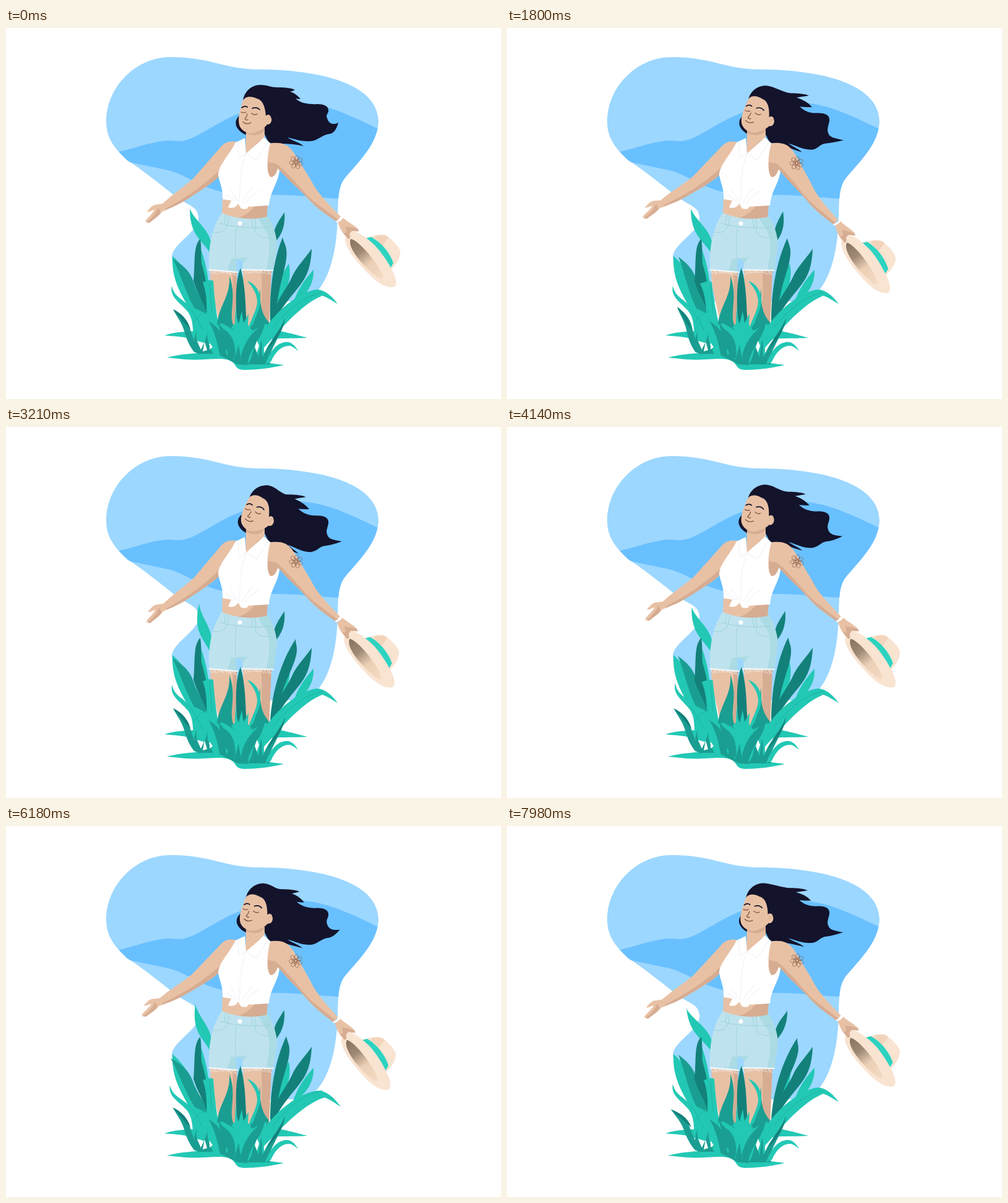
An HTML page that plays this animation: 800 by 600 pixels, repeating every 8 s.

```html
<!DOCTYPE html>
<html lang="en">
<head>
<meta charset="utf-8">
<title>Summer breeze</title>
<style>
  html, body { margin: 0; width: 100%; height: 100%; overflow: hidden; background: #fff; }
  svg { display: block; width: 100vw; height: 100vh; }
  .sky { fill: #9cd7ff } .hill { fill: #69c0ff }
  .skin { fill: #e8c1a5 } .shade { fill: #d6ac92 } .hair { fill: #13132b }
  .bright { fill: #22c8b4 } .mid { fill: #1a9e92 } .dark { fill: #13817a }
  .denim { fill: #bfe3ee } .denim2 { fill: #a5d8e2 } .white { fill: #fff }
  .line { fill: none; stroke-linecap: round; stroke-linejoin: round }
  .seam { stroke: #9bd2dd; stroke-width: 1 }
  .fold { stroke: #f1f3f8; stroke-width: 1.2 }
  .hem { stroke: #f4fafc; stroke-width: 2 }
  .fray { stroke: #f4fafc; stroke-width: .9 }
  .ink { stroke: #8c5f4a; stroke-width: .7 }
  .brow { stroke: #13132b; stroke-width: 1.7 }
  .lash { stroke: #7b4a3c; stroke-width: 1.2 }
  .vein { stroke: #1bb3a2; stroke-width: 1 }
</style>
</head>
<body>
<svg viewBox="0 0 800 600">
  <defs>
    <path id="blob" d="M162 152C162 95 210 47 266 47C330 47 352 66 405 67C480 66 602 82 602 152C600 186 575 211 549 241C533 259 538 288 535 326C532 367 522 405 502 427L465 442H320C305 420 272 400 268 372C266 350 314 329 311 306C309 288 299 290 272 271C240 245 215 226 196 214C178 197 162 180 162 152Z"/>
    <clipPath id="inBlob"><use href="#blob"/></clipPath>
    <linearGradient id="lining" gradientUnits="userSpaceOnUse" x1="560" y1="344" x2="606" y2="402">
      <stop offset="0" stop-color="#8b7662"/><stop offset=".3" stop-color="#a08a75"/>
      <stop offset=".62" stop-color="#ebcfb5"/><stop offset="1" stop-color="#f3d9c1"/>
    </linearGradient>
  </defs>

  <use href="#blob" class="sky"/>
  <path class="hill" clip-path="url(#inBlob)" d="M175 202L183 200C210 194 237 183 262 182C272 182 278 184 288 182C312 177 340 152 380 137C410 124 440 119 470 120C520 122 558 143 610 167V280L537 276C500 274 475 270 430 270C390 272 355 268 345 264C312 256 288 236 262 230L190 215Z"/>

  <!-- grass behind; data-gusts: time and sideways push of the tip -->
  <path class="bright" data-gusts="3210 15, 6180 9, 7980 -7" d="M297 292C304 310 326 324 331 345L330 364C316 342 297 335 297 292Z"/>
  <path class="dark" data-gusts="1800 -4, 5160 -7, 7980 3" d="M450 298C440 314 430 325 432 349C444 338 452 322 450 298Z"/>
  <path class="bright" d="M457 381C444 400 434 425 440 446C458 420 461 401 457 381Z"/>
  <path class="bright" d="M497 391C484 405 470 424 463 448C484 434 498 416 497 391Z"/>
  <path class="bright" d="M269 369C291 387 309 420 320 470L330 500L312 485C292 440 267 418 269 369Z"/>

  <path id="hair" class="hair"/>
  <path id="tuft" class="hair" d="M377 142C367 151 370 165 388 173L396 166V148Z"/>

  <g id="leftArm">
    <path class="skin" d="M372 184C357 182 351 187 343 197L303 243C289 256 270 268 253 284L240 286C235 288 231 293 228 297C230 299 237 294 240 294C236 301 229 307 226 311C224 314 229 316 232 315C239 308 247 305 252 297C265 292 283 283 302 271C318 260 336 250 347 237L372 210Z"/>
    <path class="shade" d="M362 200C355 222 338 238 322 250C305 264 287 276 258 292L258 294C278 287 290 279 302 271C318 260 336 250 347 237L368 212ZM246 290C243 299 236 307 228 314L232 315C240 308 246 305 250 298Z"/>
  </g>

  <!-- legs -->
  <path class="skin" d="M330 390H372C374 430 366 460 368 486H345C342 450 330 430 330 390ZM383 390H429L425 486H389C388 450 383 425 383 390Z"/>
  <path class="shade" d="M412 390H429L425 486H414C410 460 416 425 412 390ZM366 394H373C374 430 371 460 370 486H362C362 450 369 430 366 394Z"/>

  <!-- torso -->
  <path class="skin" d="M388 160L387 208H402L418 180V158ZM350 275L423 283L421 308C395 314 365 308 349 300Z"/>
  <path class="shade" d="M388 166C398 170 410 168 419 156L417 167C408 176 398 174 388 170ZM418 178L400 199L389 204L408 183ZM423 284L421 308C405 312 390 311 374 307C392 303 398 291 406 285Z"/>
  <path class="white" d="M371 185L386 178L388 203L417 177L428 187L442 230C440 252 427 262 425 287L391 289C392 292 386 294 380 292L375 284C372 291 365 292 359 290L364 279L350 277C351 260 345 250 343 238C343 222 360 207 371 185Z"/>
  <path class="line fold" d="M375 185L376 210L388 203L405 214L422 186M388 203C376 235 379 260 377 282M356 270L371 280M363 262L375 280M399 258C391 266 386 274 382 282M410 263C400 268 392 276 386 284"/>

  <!-- shorts -->
  <path class="denim" d="M349 299C370 309 400 311 424 305C434 322 440 346 437 358L432 393L381 391L376 374L374 395L328 391C327 350 333 322 349 299Z"/>
  <path class="denim2" opacity=".75" d="M408 308L424 305C434 322 440 346 437 358L432 393H421C424 370 430 345 420 328C416 320 411 316 408 308ZM364 373L391 371L383 381L381 391L376 374L374 395L358 391Z"/>
  <path class="sky" d="M372 375Q377 372 382 378L383 394H373Z"/>
  <path class="line seam" d="M346 316C370 323 400 325 427 322M372 325C370 340 371 360 371 371M334 330C346 333 356 328 357 319M402 324C402 336 413 340 424 339M355 303L353 317M360 305L358 319M397 309L399 323M402 308L404 323"/>
  <circle cx="378" cy="316" r="3.5" class="white"/>
  <path class="line hem" d="M328 391L374 395M381 391L432 392"/>
  <path id="fray" class="line fray"/>

  <g id="head">
    <path class="skin" d="M383 117C379 130 374 145 377 157C380 166 390 171 399 170C411 167 419 160 422 156C428 157 431 149 428 144C427 140 423 139 420 142C419 128 415 116 405 114C397 110 387 110 383 117Z"/>
    <path class="line brow" d="M381 129Q386 125 390 128M398 130Q405 127 410 132"/>
    <path class="line lash" d="M380 136Q384 138 388 136M397 138Q402 142 406 139M390 139Q389 144 386 147Q388 150 391 148M383 152Q389 157 396 153"/>
    <path class="line" stroke="#d6ac92" d="M422 149Q424 145 427 145"/>
  </g>

  <path class="skin" d="M427 187C422 205 420 232 427 241C434 242 438 233 441 222L461 218L452 191C442 185 434 185 427 187Z"/>
  <path class="shade" d="M424 216C422 226 423 236 428 241C434 241 437 235 441 222C433 217 428 219 424 216Z"/>

  <g id="rightArm">
    <path class="skin" d="M430 187C449 183 459 191 468 206L494 248C503 267 522 286 541 305L534 313C518 302 505 293 495 283C477 263 459 249 440 224Z"/>
    <path class="shade" d="M432 218C444 222 452 234 464 245C480 263 491 277 506 287L537 310L534 313C518 302 505 293 495 283C477 263 459 249 440 228Z"/>
    <g id="tattoo" class="line ink"></g>
    <path fill="#f9e3d1" d="M582 340C600 333 613 333 619 339C631 349 639 358 637 366C635 377 628 385 622 391L598 373Z"/>
    <path fill="#f3d4bb" d="M598 336C610 333 615 335 618 339L608 353C605 347 602 344 596 340Z"/>
    <path fill="#2dd3c1" d="M582 340L590 338C606 346 621 364 626 380L621 389C612 369 598 350 582 340Z"/>
    <path fill="#f9e3d1" d="M558 327C582 333 609 363 621 386C631 402 634 418 626 419C606 421 586 398 573 384C557 367 544 345 549 338Z"/>
    <path fill="url(#lining)" d="M557 341C569 343 596 374 606 394C612 405 609 408 602 404C582 390 550 356 557 341Z"/>
    <path class="skin" d="M536 313L545 307C552 314 561 317 569 325L570 329L559 327L555 333C557 338 556 341 553 341C546 334 540 327 536 313Z"/>
    <path class="shade" d="M548 321C558 323 562 322 569 326L570 329L559 328L555 333C557 338 556 341 553 341L544 330C550 333 552 331 548 321Z"/>
    <path class="line" stroke="#fff" stroke-width="3" d="M535 313Q541 311 544 306"/>
  </g>

  <!-- grass in front -->
  <path class="dark" data-gusts="0 -6, 3210 15, 7980 16" d="M453 340C455 350 459 354 458 366C456 392 441 415 437 466L427 475C427 430 434 380 453 340Z"/>
  <path class="dark" d="M494 357C484 372 468 388 462 403C452 425 434 442 427 478L438 467C450 446 462 433 473 419C487 402 493 385 494 357Z"/>
  <path class="bright" d="M315 358C321 374 328 400 330 440L325 460C316 430 313 390 315 358Z"/>
  <path class="mid" data-gusts="0 -7, 3210 -8, 6180 -11" d="M277 370C293 382 304 393 308 416C314 435 326 448 328 470L311 462C295 437 288 398 277 370Z"/>
  <path class="dark" d="M314 341C302 352 306 380 303 409C309 430 320 443 325 463L329 460C328 430 322 400 316 381C315 365 316 352 314 341Z"/>
  <path class="bright" data-gusts="1800 -6, 4600 -6" d="M318 411C325 409 330 406 335 409C337 440 341 470 346 492L322 485C326 455 325 430 318 411Z"/>
  <path class="bright" data-gusts="4140 4, 6180 -3" d="M268 417C264 436 282 444 294 459C303 472 301 485 303 493L340 505L341 478C322 454 304 458 285 440C275 433 270 427 268 417Z"/>
  <path class="mid" d="M361 401C363 435 344 448 341 480L345 495L375 492C353 470 376 441 361 401Z"/>
  <path class="dark" d="M379 388C370 410 371 445 374 492L390 485C386 455 389 425 379 388Z"/>
  <path class="mid" d="M411 421C407 440 411 452 400 465L390 500L416 502L425 476C413 462 410 448 411 421Z"/>
  <path class="bright" d="M390 409C402 413 410 424 411 438C412 454 404 463 400 478L390 490C396 470 406 456 406 442C405 427 398 419 390 409Z"/>
  <path class="bright" d="M371 443C371 460 373 470 376 478L381 458L384 477L392 462L391 480L400 492H372L364 484L370 478Z"/>
  <path class="bright" data-gusts="6180 5" d="M536 446C526 433 515 423 502 423C475 426 443 454 426 476L395 510L405 530L435 497C457 472 485 443 511 433C521 436 528 442 536 446Z"/>
  <path class="line vein" d="M511 428C480 433 451 460 432 484M296 452C306 463 311 474 318 488M329 414L333 460M326 458Q309 464 304 476"/>

  <path class="bright" d="M256 497C280 489 302 492 322 488L345 491H400L426 487C455 492 468 496 487 501C462 503 438 500 421 505L400 515H340L305 505C290 499 274 499 256 497Z"/>
  <path class="bright" d="M260 533C283 527 300 527 317 525L331 510C340 490 330 480 350 478L374 492L397 490L421 478C423 496 416 510 417 525L426 542L449 545C430 550 403 553 385 553C367 552 375 543 360 537C345 532 320 538 290 536Z"/>
  <path class="mid" data-gusts="1800 5, 5160 -9, 7980 -5" d="M270 455C281 460 293 470 297 485C301 500 308 515 314 528L304 524C295 512 291 501 288 490C284 476 276 467 270 455Z"/>
  <path class="dark" data-gusts="1800 5, 5160 -9, 7980 -5" d="M270 455C281 460 293 470 298 487C291 481 283 470 270 455Z"/>
  <path class="mid" d="M327 474C343 484 349 490 357 518L352 530L345 527C341 505 336 489 327 474Z"/>
  <path class="mid" d="M343 474C345 494 352 504 358 524L370 535C372 514 368 500 356 490C350 486 346 482 343 474Z"/>
  <path class="mid" d="M419 473C405 490 386 498 379 535L390 545C394 514 414 507 419 473Z"/>
  <path class="mid" d="M326 486C324 502 327 513 335 527L312 527C318 511 325 505 326 486ZM309 488C304 506 314 513 317 527L306 524C303 510 303 501 309 488Z"/>
  <path class="white" d="M321 507L318 523L325 521ZM329 509L329 520L334 516ZM406 506C400 517 402 523 404 529L409 514Z"/>
  <path class="mid" d="M451 469C448 490 434 509 428 525L426 544H390C400 532 397 521 402 516L408 532L412 504C416 516 412 525 415 532C424 507 441 494 451 469Z"/>
  <path class="dark" d="M451 469C448 490 436 505 423 520C430 500 444 490 451 469Z"/>
  <path class="bright" d="M472 522C465 510 457 505 447 509C435 512 425 526 419 544L428 540C436 521 448 513 459 514C465 516 468 519 472 522Z"/>
  <path class="mid" d="M345 529L352 511L357 530L361 518L369 537L376 512L380 538L387 523L391 545L374 544Z"/>
</svg>

<script>
const LOOP = 8000;
const $ = id => document.getElementById(id);
const numbers = text => text.match(/-?[\d.]+/g).map(Number);
const pairs = text => text.split(',').map(numbers);

// Eases from each turning point to the next.
function eased(text) {
  const keys = pairs(text);
  return t => {
    const i = Math.max(1, keys.findIndex(key => key[0] > t));
    const [[t0, v0], [t1, v1]] = [keys[i - 1], keys[i]];
    const u = Math.min(1, (t - t0) / (t1 - t0));
    return v0 + (v1 - v0) * u * u * (3 - 2 * u);
  };
}
const headTilt = eased('0 0, 2900 11.2, 4300 6.8, 8000 3.4');
const hairStretch = eased('0 0, 1800 1, 4140 .75, 5160 1, 6180 .35, 8000 .9');
const rightSwing = eased('0 0, 820 -4.2, 1800 3.1, 2440 -1.8, 3800 2.4, 4980 -6, 6100 2.6, 6900 -1.9, 8000 .8');
const leftSwing = eased('0 0, 1650 2.9, 3210 -.8, 5500 3.8, 7200 1, 8000 1.6');

// Every lock drops as the head tilts back, and the wind stretches its tip.
function hairPath(tilt, stretch) {
  const a = tilt * Math.PI / 180, c = Math.cos(a), s = Math.sin(a);
  const onHead = (x, y) => [404 + (x - 404) * c - (y - 170) * s, 170 + (x - 404) * s + (y - 170) * c];
  const off = (p, x, y) => [p[0] + x, p[1] + y];
  const lock1 = [467 + 21 * stretch, 100 + 1.25 * tilt];
  const lock2 = [476 + 17 * stretch, 115 + 1.7 * tilt];
  const lobe = [521, 133 + 1.9 * tilt];
  const end = off(lobe, 16 + 7 * stretch, 20 + 14 * stretch);
  const belly = [493, 183 + 1.8 * tilt];
  const wisp = [481 - .07 * tilt * tilt, 191 + 1.3 * tilt];
  const curl = 541 - end[0];
  const crest = off(lock1, -28, -4);
  const notch1 = [459 + 9 * stretch, lock1[1] + 3];
  const notch2 = [468 + 5 * stretch, lock2[1] - 1];
  const back = off(lobe, -18, -10);
  const dent = [lobe[0] - 2, lobe[1] + .64 * (end[1] - lobe[1])];
  const under = [515 + (544 - end[0]) * 1.1, (end[1] + belly[1]) / 2 + curl * .8];
  const joint = [455, wisp[1] - 14];
  return ['M', onHead(383, 119), 'C', onHead(384, 103), onHead(397, 92), onHead(411, 92),
    'C', onHead(423, 92), off(crest, -12, 0), crest,
    'C', off(crest, 12, 0), off(lock1, -6, -3), lock1,
    'Q', off(notch1, 5, -1), notch1, 'Q', off(lock2, -8, -10), lock2,
    'Q', off(notch2, 4, 1), notch2,
    'C', off(notch2, 8, 8), off(back, -12, 1), back,
    'C', off(lobe, -6, -10), off(lobe, 0, -6), lobe,
    'C', off(lobe, 1, 5), off(dent, -3, -6), dent,
    'C', off(dent, 2, 8), [dent[0] + 9, end[1] + curl * 1.3], end,
    'Q', off(under, 10, -1), under,
    'C', off(under, -10, 1), off(belly, 10, -1), belly,
    'C', off(belly, -15, 1), off(joint, 12, 3), joint,
    'C', off(joint, 8, 6), off(wisp, -10, -8), wisp,
    'Q', off(wisp, -15, -4), [440, 187], 'L', [425, 186], 'L', [412, 160], 'Z'].join(' ');
}

// A blade's path starts at its tip; its root is the farthest point.
const blades = [...document.querySelectorAll('[data-gusts]')].map(el => {
  const shape = el.getAttribute('d'), n = numbers(shape), points = [];
  for (let i = 0; i < n.length; i += 2) points.push([n[i], n[i + 1]]);
  const tip = points[0], reach = p => Math.hypot(p[0] - tip[0], p[1] - tip[1]);
  const root = points.reduce((a, b) => reach(b) > reach(a) ? b : a);
  const bend = points.map(p => (1 - reach(p) / reach(root)) ** 1.4);
  const rise = (tip[0] - root[0]) / (root[1] - tip[1]);
  return { el, shape, points, bend, rise, gusts: pairs(el.dataset.gusts) };
});

function sway({ el, shape, points, bend, rise, gusts }, t) {
  const push = gusts.reduce((sum, [when, size]) => sum + size * Math.exp(-(((t - when) / 600) ** 2)), 0);
  const moved = points.flatMap(([x, y], i) => [x + push * bend[i], y + push * rise * bend[i]]);
  let i = 0;
  el.setAttribute('d', shape.replace(/-?[\d.]+/g, () => moved[i++].toFixed(2)));
}

function drawDetails() {
  let threads = '';
  for (let x = 330; x < 430; x += 4) {
    if (x > 372 && x < 382) continue;
    const y = x < 376 ? 391 + (x - 328) * .09 : 392;
    threads += `M${x} ${y}q${2 * Math.sin(x)} 4 3 ${5 + 2 * Math.sin(x * 1.7)}`;
  }
  $('fray').setAttribute('d', threads);

  let petals = '';
  for (const [count, size, length] of [[5, 1, 6], [7, 1.6, 11]])
    for (let k = 0; k < count; k++)
      petals += `<path transform="translate(469 217) rotate(${k * 360 / count + 20})" d="M2 0C4 ${-3 * size} ${length} ${-2 * size} ${length} 0S4 ${3 * size} 2 0"/>`;
  $('tattoo').innerHTML = petals;
}

function draw(t) {
  const tilt = headTilt(t), stretch = hairStretch(t);
  const turn = (id, angle, x, y) => $(id).setAttribute('transform', `rotate(${angle} ${x} ${y})`);
  turn('head', tilt, 404, 170);
  turn('rightArm', rightSwing(t), 440, 200);
  turn('leftArm', leftSwing(t), 365, 190);
  $('tuft').setAttribute('transform', `translate(${4 * stretch} 0)`);
  $('hair').setAttribute('d', hairPath(tilt, stretch));
  blades.forEach(blade => sway(blade, t));
}

drawDetails();
const start = performance.now();
function frame() {
  draw((performance.now() - start) % LOOP);
  requestAnimationFrame(frame);
}
frame();
</script>
</body>
</html>
```
